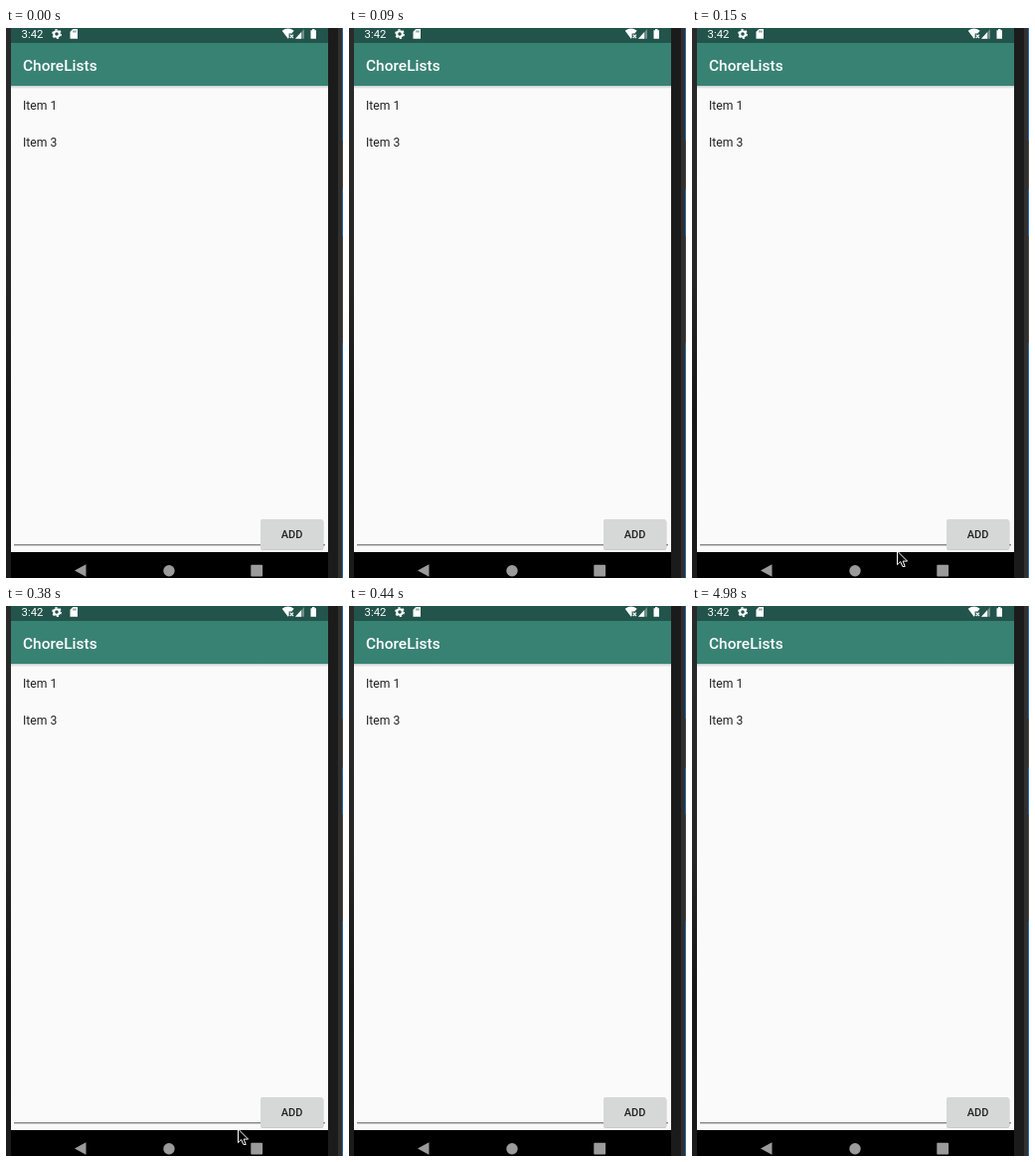
These frames come from a looping animation (339 by 552 pixels, 8000 ms). An HTML page:

```html
<!DOCTYPE html>
<html lang="en">
<head>
<meta charset="utf-8">
<title>To-do list</title>
<style>
html, body { margin: 0; width: 100%; height: 100%; overflow: hidden; background: #1b1b1b; }
svg { display: block; width: 339px; height: 552px; }
text { font-family: Roboto, sans-serif; }
.medium { font-weight: 500; }
</style>
</head>
<body>
<svg viewBox="0 0 339 552">
  <defs>
    <linearGradient id="shade" x2="0" y2="1">
      <stop stop-color="#c9cdcc"/><stop offset="1" stop-color="#fafafa"/>
    </linearGradient>
    <linearGradient id="side" x2="0" y2="1">
      <stop stop-color="#2a2a2a"/><stop offset=".45" stop-color="#262626"/>
      <stop offset=".7" stop-color="#171717"/><stop offset="1" stop-color="#1b1b1b"/>
    </linearGradient>
  </defs>

  <!-- device frame and desktop edge -->
  <rect width="339" height="552" fill="url(#side)"/>
  <rect x="324" width="10" height="552" fill="#1b1b1b"/>
  <rect x="334" width="4" height="552" fill="#303030"/>
  <rect x="338" width="1" height="552" fill="#2368ad"/>
  <path d="M338 113h1v49h-1zM338 209h1v107h-1z" fill="#51443c"/>

  <!-- screen -->
  <rect x="5" width="319" height="552" fill="#fafafa"/>
  <rect x="5" width="319" height="15" fill="#22544b"/>
  <rect x="5" y="15" width="319" height="43" fill="#388274"/>
  <rect x="5" y="58" width="319" height="3" fill="url(#shade)"/>

  <!-- status icons -->
  <text x="15.5" y="10" font-size="11.4" fill="#fff">3:42</text>
  <g fill="none" stroke="#fff">
    <circle cx="51" cy="6" r="2.8" stroke-width="2"/>
    <circle cx="51" cy="6" r="4.2" stroke-width="1.5" stroke-dasharray="2.2 2.2"/>
  </g>
  <path d="M67.3 1H72v9.8h-7.5V3.8z" fill="#fff"/>
  <path d="M68 2.5v2M70 2.5v2" stroke="#22544b" stroke-width=".9"/>
  <path d="M277.7 2.7Q283.7-1.5 289.7 2.7L287.4 5.6H284.6V9.8L283.7 10.8z" fill="#fff"/>
  <path d="M285.7 6.7l3.3 3.3M289 6.7l-3.3 3.3" stroke="#fff" stroke-width="1.1"/>
  <path d="M300 1v9.8h-9z" fill="#6d8e88"/>
  <path d="M297 4.3v6.5h-6z" fill="#fff"/>
  <path d="M308 1h2.5v1.2h1.5v8.6h-5.5V2.2H308z" fill="#fff"/>

  <text class="medium" x="17" y="43" font-size="15.5" fill="#fff">ChoreLists</text>
  <g font-size="12.2" fill="#222">
    <text x="17" y="81.5">Item 1</text>
    <text x="17" y="119">Item 3</text>
  </g>

  <!-- input line and button -->
  <rect x="8" y="518" width="313" height="1.5" fill="#8b8b8b"/>
  <rect x="256" y="494" width="63.5" height="30" rx="2" fill="#aaa" opacity=".6"/>
  <rect x="256" y="493" width="63" height="30" rx="2" fill="#d6d8d7"/>
  <text class="medium" x="276.7" y="512" font-size="11" fill="#222">ADD</text>

  <!-- navigation -->
  <rect x="5" y="526" width="319" height="26" fill="#000"/>
  <g fill="#9b9b9b">
    <path d="M69 544.5L80.5 538.3V550.8z"/>
    <circle cx="164" cy="544.7" r="5.7"/>
    <rect x="246.3" y="538.8" width="11.8" height="11.8" rx="1"/>
  </g>

  <path id="cursor" d="M.5 .5V14.2L3.7 11.1L5.9 16H8.2L6.2 10.6H10.6z"
    fill="#000" stroke="#fff" stroke-width="1" visibility="hidden"/>
</svg>
<script>
const LOOP = 8000;
const cursor = document.getElementById("cursor");
const steps = [
  { until: 150 },
  { until: 290, x: 206 },
  { until: 440, x: 233 },
  { until: LOOP }
];

function render(t) {
  const { x } = steps.find(s => t < s.until);
  cursor.setAttribute("visibility", x ? "visible" : "hidden");
  if (x) cursor.setAttribute("transform", `translate(${x} 524.5)`);
}

const start = performance.now();
function tick() {
  render((performance.now() - start) % LOOP);
  requestAnimationFrame(tick);
}
tick();
</script>
</body>
</html>
```
